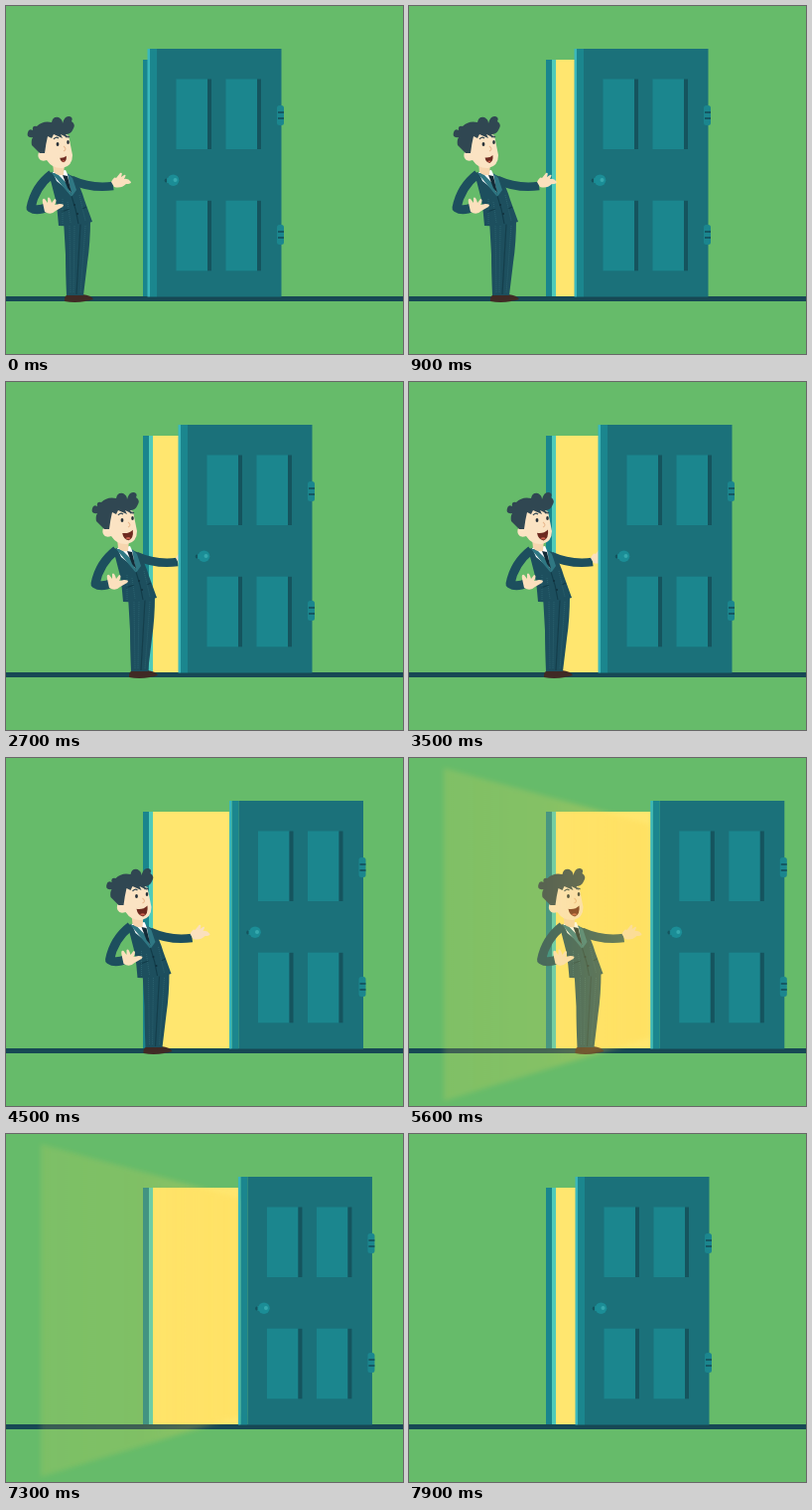
An HTML page for the animation above (8000 ms loop, 400x350 px).

```html
<!DOCTYPE html>
<html lang="en">
<head>
<meta charset="utf-8">
<title>Opening door</title>
<style>
  html, body { margin: 0; width: 100%; height: 100%; overflow: hidden; background: #66bb6a; }
  svg { display: block; width: 400px; height: 350px; }
</style>
</head>
<body>
<svg viewBox="0 0 400 350">
  <defs>
    <linearGradient id="glow" gradientUnits="userSpaceOnUse" x1="35" y1="0" x2="243" y2="0">
      <stop offset="0" stop-color="#ffd84f" stop-opacity=".17"/>
      <stop offset=".5" stop-color="#ffd84f" stop-opacity=".2"/>
      <stop offset="1" stop-color="#ffd84f" stop-opacity=".38"/>
    </linearGradient>
    <filter id="soft" x="-10%" y="-10%" width="120%" height="120%"><feGaussianBlur stdDeviation="2.5"/></filter>
    <g id="panel">
      <path fill="#1b868e" d="M0 0h31.5v70.5H0z"/>
      <path fill="#15545e" d="M31.5 0h4v70.5h-4z"/>
    </g>
    <g id="hinge">
      <rect width="7" height="20" rx="2.5" fill="#1b868e"/>
      <path d="M1 7h6M1 13h6" stroke="#154a56" stroke-width="1.4"/>
    </g>
  </defs>

  <rect width="400" height="350" fill="#66bb6a"/>
  <rect y="292" width="400" height="5" fill="#174854"/>
  <rect id="room" x="148" y="54" height="238" fill="#ffe66f"/>
  <path fill="#1a858d" d="M138 54h6v238h-6z"/>
  <path fill="#50cbb9" d="M144 54h4v238h-4z"/>

  <g id="man">
    <g fill="#402a25">
      <path d="M59 297Q58 290 65 290H74Q80 293 80 297Q69 299 59 297Z"/>
      <path d="M73 296Q72 290 77 290Q86 291 88 295Q81 298 73 296Z"/>
    </g>
    <path fill="#1d4f5e" d="M58 215H85Q85 238 82 258L78 291H61Q60 268 60 250Z"/>
    <path d="M75 219Q73 255 71 290" fill="none" stroke="#153f4c" stroke-width="1.2"/>
    <path d="M64 221L65 289M69 221L68 289M80 221L75 289" fill="none" stroke="#34707b" stroke-width=".6" stroke-dasharray="1 1"/>
    <!-- reaching arm -->
    <path d="M66 175Q86 184 108 181" fill="none" stroke="#1d4f5e" stroke-width="8.5"/>
    <path fill="#fbe0bd" d="M106 177Q109 171 111 173L115 168Q118 167 116 172L119 170Q122 169 119 174Q123 173 126 177Q126 179 121 179Q116 184 109 182Z"/>
    <path fill="#1d4f5e" d="M43 168Q50 166 60 168L69 172Q76 184 79 195L87 217Q70 222 53 221Q52 207 50 195Z"/>
    <path d="M46 169Q29 182 25 203Q31 207 42 202" fill="none" stroke="#1d4f5e" stroke-width="9" stroke-linejoin="round"/>
    <path fill="#fff" d="M47 167L60 165L65 176L66 188L51 176Z"/>
    <path fill="#2f7783" d="M46 168L66 192L63 180L51 168ZM62 168L67 173L71 185L66 192Z"/>
    <path fill="#132a36" d="M57 170L62 171L66 188L62 183Z"/>
    <path d="M66 191Q71 205 73 219M56 207L64 204M77 204L81 202" fill="none" stroke="#123c49" stroke-width="1.1"/>
    <path d="M57 194V219M62 197L65 218M74 190L80 216" fill="none" stroke="#34707b" stroke-width=".6" stroke-dasharray="1 1"/>
    <g fill="#102f3b"><circle cx="69" cy="200" r="1"/><circle cx="72" cy="209" r="1"/></g>
    <path fill="#fbe0bd" d="M39 207L37 198Q36 193 39 194L42 198V193Q44 191 46 198L49 194Q52 194 49 200L54 199Q60 199 57 202L50 206Q45 211 39 207Z"/>
    <!-- head -->
    <path fill="#f6d5ae" d="M47 158H59L58 170Q52 171 48 167Z"/>
    <path fill="#fbe3c3" d="M35 145Q31 148 33 153Q35 157 41 155Q47 164 57 163Q67 161 67 150L63 130Q52 124 40 132Z"/>
    <path fill="#304752" d="M34 148L26 140Q25 135 27 132Q20 133 22 127Q23 123 27 125Q26 120 31 121Q37 115 46 117Q47 111 53 112Q57 114 57 118Q59 110 64 111Q68 112 66 116Q71 119 67 125Q65 129 60 129L63 133L55 129L57 133L48 129L46 133L42 131Q40 139 39 148Z"/>
    <path d="M48 134Q50 131 53 133M60 132Q62 130 64 132" fill="none" stroke="#304752" stroke-width="1.2"/>
    <ellipse cx="52" cy="139" rx="1.4" ry="2" fill="#263038"/>
    <ellipse cx="62.5" cy="137" rx="1.3" ry="2" fill="#263038"/>
    <path d="M58 141Q62 144 58 146" fill="none" stroke="#e9b98f" stroke-width="1.1"/>
    <g id="mouth">
      <path fill="#6d2a20" d="M-5-2Q1-1 5-5Q6 3 1 5Q-4 4-5-2Z"/>
      <path fill="#c9614e" d="M-2 3Q1 1 3 3Q1 5-2 3Z"/>
    </g>
  </g>

  <path id="beam" d="M35 10L243 67V281L35 345Z" fill="url(#glow)" filter="url(#soft)"/>

  <g id="door">
    <path fill="#1b717a" d="M152 43H277.5V292.5H152z"/>
    <path fill="#1b868e" d="M145 43h7v249.5h-7z"/>
    <path fill="#3ab7bb" d="M142.5 43h2.5v249.5h-2.5z"/>
    <use href="#panel" x="171.5" y="73.5"/>
    <use href="#panel" x="221.5" y="73.5"/>
    <use href="#panel" x="171.5" y="195.8"/>
    <use href="#panel" x="221.5" y="195.8"/>
    <use href="#hinge" x="273" y="100"/>
    <use href="#hinge" x="273" y="220"/>
    <ellipse cx="161.3" cy="175.5" rx="1.6" ry="2" fill="#15545e"/>
    <path fill="#1b868e" d="M162 173h4v5h-4z"/>
    <circle cx="168.5" cy="175.2" r="5.8" fill="#1b8d96"/>
    <circle cx="170.5" cy="175" r="2" fill="#36a9ae"/>
  </g>
</svg>
<script>
const LOOP = 8000, STEP = 100;
const el = id => document.getElementById(id);
const room = el('room'), man = el('man'), mouth = el('mouth'), beam = el('beam'), door = el('door');

// [time, value] keys
const doorKeys = [[0, 0], [400, 15], [900, 24], [1900, 27], [2700, 31], [3500, 48], [4500, 82.5],
  [5400, 99.5], [5700, 101], [6400, 99.5], [7200, 95], [7900, 25], [8000, 17]];
const manKeys = [[0, 0], [900, 23], [1900, 48], [2700, 65], [3500, 77], [4500, 79.5],
  [5600, 108.5], [6400, 138], [7200, 190], [8000, 220]];

const clamp = v => Math.max(0, Math.min(1, v));
const ramp = (t, from, to) => clamp((t - from) / (to - from));

// Monotone cubic through the keys
function curve(keys, t) {
  const last = keys.length - 1;
  const slope = i => (keys[i + 1][1] - keys[i][1]) / (keys[i + 1][0] - keys[i][0]);
  const tangent = i => {
    if (i === 0) return slope(0);
    if (i === last) return slope(last - 1);
    const a = slope(i - 1), b = slope(i);
    return a * b <= 0 ? 0 : 2 * a * b / (a + b);
  };
  let i = 0;
  while (i < last - 1 && t >= keys[i + 1][0]) i++;
  const [t0, v0] = keys[i], [t1, v1] = keys[i + 1];
  const span = t1 - t0, u = (t - t0) / span, w = 1 - u;
  return v0 * (1 + 2 * u) * w * w + v1 * u * u * (3 - 2 * u)
    + span * u * w * (tangent(i) * w - tangent(i + 1) * u);
}

function draw(t) {
  const open = curve(doorKeys, t);
  door.setAttribute('transform', `translate(${open})`);
  room.setAttribute('width', Math.max(0, open - 5));
  man.setAttribute('transform', `translate(${curve(manKeys, t)})`);
  man.setAttribute('opacity', 1 - ramp(t, 6600, 7300));
  mouth.setAttribute('transform', `translate(57.5 154) scale(${0.65 + 0.45 * ramp(t, 0, 3000)})`);
  beam.setAttribute('opacity', ramp(t, 4500, 5600) * (1 - ramp(t, 7200, 7900)));
}

function tick(now) {
  draw(Math.floor(now % LOOP / STEP) * STEP);
  requestAnimationFrame(tick);
}
draw(0);
requestAnimationFrame(tick);
</script>
</body>
</html>
```
